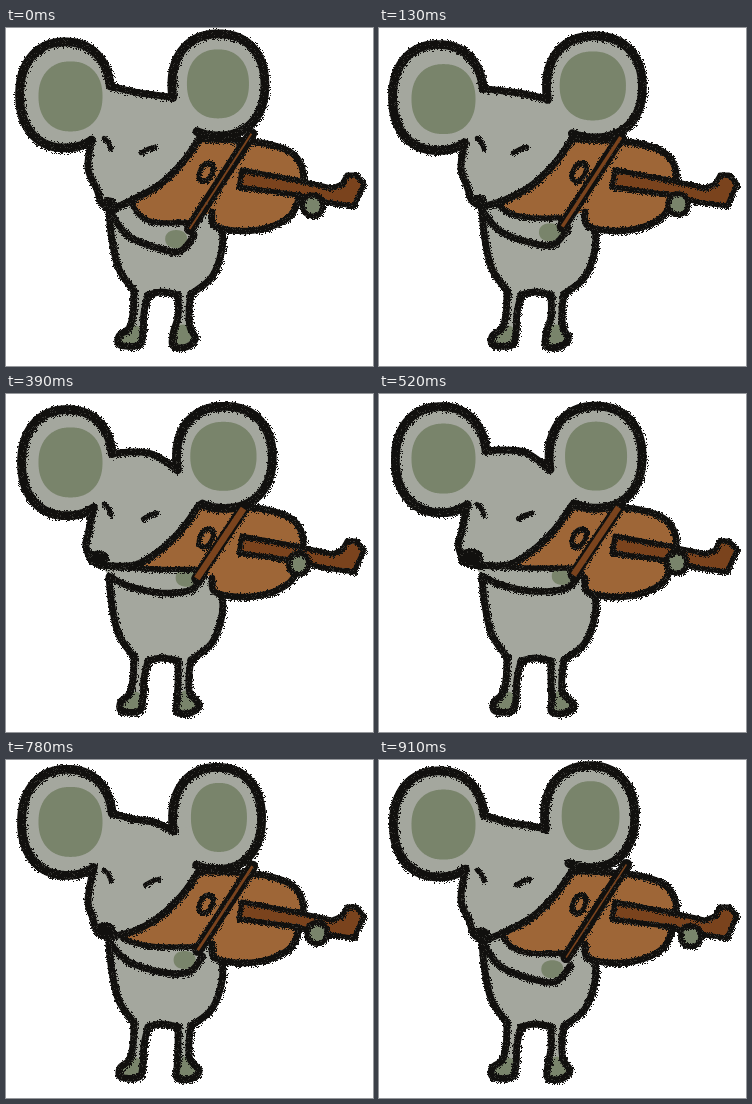
Write an HTML page with a canvas that moves like this. It is 367x338 px and loops after 1.04 s.

```html
<!DOCTYPE html>
<html lang="en">
<head>
<meta charset="utf-8">
<title>Mouse playing the violin</title>
<style>
html, body { margin: 0; width: 100%; height: 100%; overflow: hidden; background: #fff; }
canvas { display: block; }
</style>
</head>
<body>
<canvas id="stage" width="367" height="338"></canvas>
<script>
const ctx = document.getElementById('stage').getContext('2d');
const FUR = '#a4a79e', GREEN = '#79846b', WOOD = '#9e6637', DARK_WOOD = '#7a431d', INK = '#11100e';
const STEP = 130, STEPS = 8;

let seed = 1;
const random = () => (seed = (seed * 16807) % 2147483647) / 2147483647;
const reversed = line => line.slice().reverse();
const last = line => line[line.length - 1];

// Every part swings once per loop around its middle, furthest at step `peak`.
function poseAt(step) {
  const wave = (mid, swing, peak) => mid + swing * Math.cos((step - peak) * 2 * Math.PI / STEPS);
  const earRightY = wave(60, 3.5, 3.4), noseWidth = wave(8, 3, 4.5);
  return {
    earL: [wave(60.5, 1.5, 4.5), wave(66.3, 4, 1.8), 45.5, 53],
    earR: [wave(214.5, 4, 2.7), earRightY, wave(46.5, 2, 2), 51],
    innerL: [64.5, wave(66.5, 5, 1.5), 32, 35],
    innerR: [wave(214.5, 3, 3.3), earRightY - 1, wave(31, 3, 2), 34.5],
    nose: [wave(97, 6, 7.7), wave(169, 5.5, 7.7), noseWidth, noseWidth * 0.7],
    brow: wave(59, 4, 0.3),
    eyeX: wave(138, 3, 5),
    palm: [wave(177, 7, 4.3), wave(196.5, 15, 7.7), 11, 9],
    fist: [wave(302, 10, 6.6), wave(173, 4.5, 0), 10, 10.5],
    bow: [[wave(242.5, 5, 6.8), wave(109.5, 5, 3.1)], [wave(189, 6, 4.6), wave(191, 10, 0.1)]],
    bowWood: wave(4, 2.5, 3.3),
    footL: wave(1, 1, 4),
    footR: wave(0, 3, 4.5)
  };
}

// Catmull-Rom curve through the points, sampled about every pixel.
function curve(pts, closed) {
  const n = pts.length, out = [];
  const p = i => pts[closed ? (i + n) % n : Math.max(0, Math.min(n - 1, i))];
  for (let i = 0; i < (closed ? n : n - 1); i++) {
    const a = p(i - 1), b = p(i), c = p(i + 1), d = p(i + 2);
    const count = Math.max(1, Math.ceil(Math.hypot(c[0] - b[0], c[1] - b[1])));
    for (let s = 0; s < count; s++) {
      const t = s / count;
      out.push([0, 1].map(k => b[k] + t / 2 * (c[k] - a[k] +
        t * (2 * a[k] - 5 * b[k] + 4 * c[k] - d[k] + t * (3 * (b[k] - c[k]) + d[k] - a[k])))));
    }
  }
  out.push(p(closed ? 0 : n - 1));
  return out;
}

// Part of a slightly squared ellipse, angles in degrees.
function arc([x, y, rx, ry], from = 0, to = 360) {
  const out = [], count = Math.ceil(Math.abs(to - from) * Math.max(rx, ry) / 57);
  const bulge = v => Math.sign(v) * Math.abs(v) ** 0.9;
  for (let i = 0; i <= count; i++) {
    const a = (from + (to - from) * i / count) * Math.PI / 180;
    out.push([x + rx * bulge(Math.cos(a)), y + ry * bulge(Math.sin(a))]);
  }
  return out;
}

function trace(line) {
  ctx.beginPath();
  line.forEach(([x, y]) => ctx.lineTo(x, y));
}

function fill(line, color) {
  trace(line);
  ctx.fillStyle = color;
  ctx.fill();
}

function stroke(line, width, color, cap) {
  trace(line);
  ctx.strokeStyle = color;
  ctx.lineWidth = width;
  ctx.lineCap = cap;
  ctx.lineJoin = 'round';
  ctx.stroke();
}

// Charcoal line: solid core, ragged rim and a little grain.
function ink(line, width) {
  stroke(line, width * 0.8, INK, 'round');
  for (const [x, y] of line)
    for (let i = 0; i < 6; i++) {
      const a = random() * Math.PI * 2, r = (width / 2 + 0.8) * Math.sqrt(random());
      ctx.fillStyle = i === 0 ? '#34332f' : INK;
      ctx.fillRect(Math.round(x + r * Math.cos(a)), Math.round(y + r * Math.sin(a)), 1, 1);
    }
}

function outlined(line, color, width) {
  fill(line, color);
  ink(line, width);
}

function drawBody({ footL, footR }) {
  const sideL = curve([[103, 184], [106, 212], [113, 241], [128, 263]]);
  const sideR = curve([[206, 184], [216, 203], [215, 226], [205, 250], [185, 266]]);
  const legL = curve([[128, 263], [127, 285], [123, 300], [113 + footL, 308], [114 + footL, 317],
    [133, 317], [137, 304], [138, 285], [142, 267]]);
  const crotch = curve([[142, 267], [156, 264], [172, 267]]);
  const legR = curve([[172, 267], [172, 288], [170 + footR, 305], [170 + footR, 318], [183 + footR, 319],
    [192 + footR, 311], [184, 299], [183, 282], [185, 266]]);
  fill([...sideL, ...legL, ...crotch, ...legR, ...reversed(sideR)], FUR);
  fill(curve([[125, 298], [115 + footL, 309], [116 + footL, 315], [132, 316], [135, 301]], true), GREEN);
  fill(curve([[174 + footR, 299], [172 + footR, 316], [183 + footR, 317], [190 + footR, 311], [182, 298]], true), GREEN);
  [sideL, sideR, legL, crotch, legR].forEach(line => ink(line, 8.5));
}

function drawViolin(chin, armTop, fist) {
  const rim = curve([[193, 111], [225, 112], [262, 116], [287, 126], [297, 144], [294, 166],
    [285, 187], [264, 199], [236, 203], [209, 198], [206, 184]]);
  fill([...chin, ...rim, ...reversed(armTop)], WOOD);
  ink(rim, 8);
  ink(arc([0, 0, 6, 9]).map(([x, y]) => [200 + x - y * 0.4, 144 + y + x * 0.2]), 5.5);
  const neck = [[236, 142], [290, 152], [326, 160], [336, 156], [341, 147], [350, 147], [358, 156],
    [348, 178], [318, 174], [292, 167], [233, 159]];
  outlined(neck.flatMap((p, i) => curve([p, neck[(i + 1) % neck.length]])), DARK_WOOD, 6);
  outlined(arc(fist), GREEN, 6);
}

function drawHead({ earL, earR, innerL, innerR, nose, brow, eyeX }, chin) {
  const [noseX, noseY] = nose;
  const rimL = arc(earL, -8, -303), rimR = arc(earR, 168, 475);
  const crown = curve([rimL[0], [128, brow + 1], [148, brow + 4], rimR[0]]);
  const face = curve([last(rimL), [82, 140], [noseX - 12, noseY - 13], [noseX - 7, noseY + 1], chin[0]]);
  fill(arc(earL), FUR);
  fill(arc(earR), FUR);
  fill([earL, ...crown, earR, ...reversed(chin), ...reversed(face)], FUR);
  fill(arc(innerL), GREEN);
  fill(arc(innerR), GREEN);
  ink(rimL, 11);
  ink(rimR, 11);
  [crown, face, chin].forEach(line => ink(line, 8.5));
  outlined(arc(nose), INK, 3);
  ink(curve([[98, 110], [102, 114], [105, 121]]), 5.5);
  ink(curve([[eyeX - 1, 125], [eyeX + 6, 121], [eyeX + 13, 119]]), 5.5);
}

// The arm follows the palm; the violin's lower edge shows above it.
function armLines([x, y], chin) {
  const drop = y - 179, startX = 108 + 0.85 * drop;
  const joint = chin.findIndex(p => p[0] > startX - 12);
  return {
    joint,
    low: curve([[103, 182], [122, 189 + 0.58 * drop], [154, 195 + 0.8 * drop], [x + 4, y + 12], [x + 18, y - 4]]),
    top: curve([chin[joint], [startX, 170 + 0.58 * drop], [152, 172 + 0.7 * drop], [x + 10, 172 + 0.7 * drop]])
  };
}

function draw(step) {
  const pose = poseAt(step);
  seed = 977 + step * 7919;
  fill([[0, 0], [367, 0], [367, 338], [0, 338]], '#fff');
  const chin = curve([[pose.nose[0] + 3, pose.nose[1] + 7], [128, 171], [153, 157], [176, 135], [193, 111]]);
  const { joint, low, top } = armLines(pose.palm, chin);
  drawBody(pose);
  fill([...chin.slice(0, joint), ...top, ...reversed(low)], FUR);
  drawViolin(chin.slice(joint), top, pose.fist);
  drawHead(pose, chin);
  fill(arc(pose.palm), GREEN);
  ink(top, 6.5);
  ink(low, 8);
  const stick = curve(pose.bow);
  ink(stick, 14);
  stroke(stick, pose.bowWood, DARK_WOOD, 'butt');
}

let shown = -1;
function tick() {
  const step = Math.floor(performance.now() / STEP) % STEPS;
  if (step !== shown) draw(shown = step);
  requestAnimationFrame(tick);
}
tick();
</script>
</body>
</html>
```
